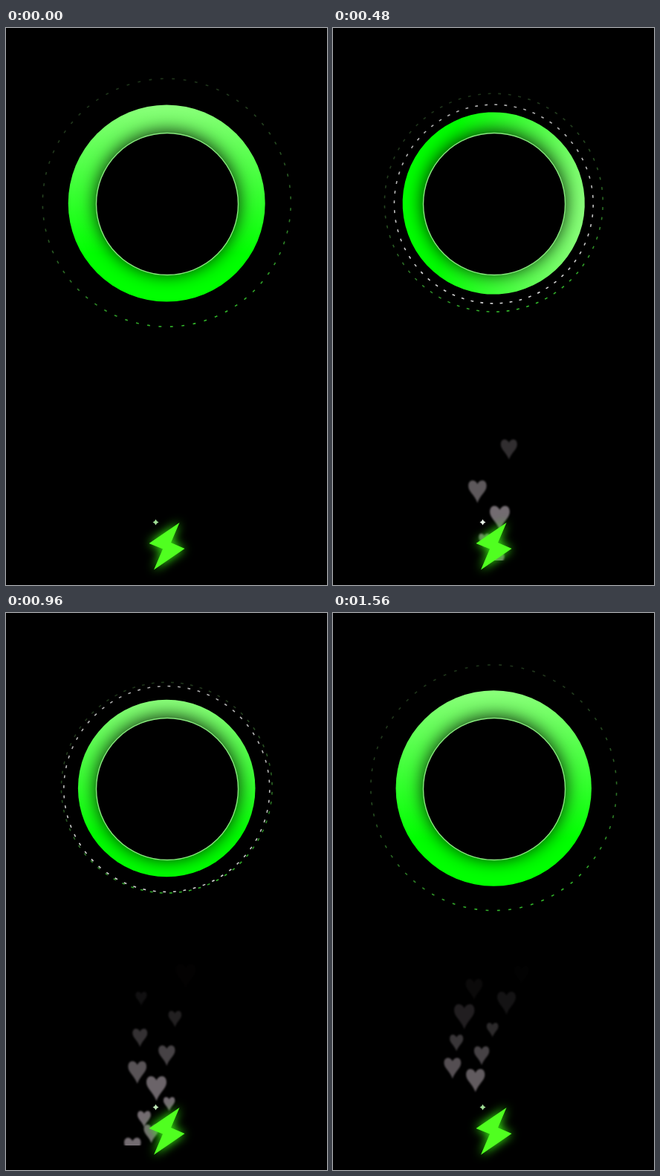
Animation of 432x750 px, one loop 1600 ms. Source, as an HTML page with a canvas:

```html
<!DOCTYPE html>
<html lang="en">
<head>
<meta charset="utf-8">
<title>Charging ring</title>
<style>
  html, body { margin: 0; width: 100%; height: 100%; overflow: hidden; background: #000; }
  canvas { display: block; }
</style>
</head>
<body>
<canvas id="stage" width="432" height="750"></canvas>
<script>
const ctx = document.getElementById('stage').getContext('2d');
const LOOP = 1600, STEP = 40, TURN = Math.PI * 2;
const HEARTS = 20, FLOOR = 717, CEILING = 480, RISE = .356;

const mix = (a, b, k) => a + (b - a) * k;
const clamp = v => Math.min(1, Math.max(0, v));
const fract = v => v % 1;
const easeInOut = k => k < .5 ? 4 * k ** 3 : 1 - 4 * (1 - k) ** 3;

// Goes from a to b until the peak, then to c at the end of the loop
const swing = (t, peak, a, b, c = a) =>
  t < peak ? mix(a, b, t / peak) : mix(b, c, (t - peak) / (LOOP - peak));

function circle(x, y, r) {
  ctx.beginPath();
  ctx.arc(x, y, r, 0, TURN);
}

function dots(cx, cy, r, count, phase, color) {
  ctx.lineWidth = 1.6;
  const half = 1.9 / r;
  for (let i = 0; i < count; i++) {
    const a = Math.PI / 2 + phase + i * TURN / count;
    ctx.strokeStyle = color(a);
    ctx.beginPath();
    ctx.arc(cx, cy, r, a - half, a + half);
    ctx.stroke();
  }
}

function greenDot(a) {
  const k = (1 + Math.sin(a + .3)) / 2;
  return `rgb(${mix(30, 50, k)},${mix(52, 185, k * k)},${mix(26, 42, k)})`;
}

function whiteDot(a) {
  const v = mix(170, 212, (1 + Math.sin(a)) / 2);
  return `rgb(${v},${v},${v})`;
}

function ring(t) {
  const r = swing(t, 800, 132.5, 116);
  ctx.save();
  ctx.translate(216.2, 236);
  ctx.rotate(-TURN * easeInOut(clamp((t - 16) / 784)));
  const shade = ctx.createLinearGradient(0, -r, 0, r);
  shade.addColorStop(0, '#8aff7a');
  shade.addColorStop(.76, '#00ff00');
  ctx.fillStyle = shade;
  circle(0, 0, r);
  ctx.fill();
  ctx.restore();

  ctx.save();
  ctx.shadowColor = 'rgba(0,0,0,.9)';
  ctx.shadowBlur = 24;
  ctx.shadowOffsetY = -2;
  ctx.fillStyle = '#000';
  circle(217, 237, 95.5);
  ctx.fill();
  ctx.restore();
  ctx.strokeStyle = '#86e87c';
  ctx.lineWidth = 1.4;
  circle(217, 237, 95.5);
  ctx.stroke();
}

function heartShape(x, y, w) {
  ctx.save();
  ctx.translate(x, y);
  ctx.scale(w / 2, w * .62);
  ctx.beginPath();
  ctx.moveTo(0, -.66);
  ctx.bezierCurveTo(.2, -1.1, 1, -1.15, 1, -.5);
  ctx.bezierCurveTo(1, 0, .3, .3, 0, 1);
  ctx.bezierCurveTo(-.3, .3, -1, 0, -1, -.5);
  ctx.bezierCurveTo(-1, -1.15, -.2, -1.1, 0, -.66);
  ctx.fill();
  ctx.restore();
}

// Hearts leave the bolt ever faster, drift back towards its axis and fade as they rise
function hearts(t) {
  ctx.save();
  ctx.beginPath();
  ctx.rect(0, 0, 432, FLOOR);
  ctx.clip();
  ctx.filter = 'blur(.8px)';
  ctx.fillStyle = '#c0b4bc';
  for (let i = 0; i < HEARTS; i++) {
    const born = 60 + 1300 * (i / HEARTS) ** .7;
    const age = t - born;
    const y = FLOOR - RISE * age;
    if (y < CEILING || y > FLOOR + 20) continue;
    const spread = fract(.9 + .45 * i) - .5;
    const offset = -14 + 22 * Math.cos((born - 475) / 1250 * TURN) + 30 * spread;
    const drift = (30 * spread - .3 * offset) / 160;
    const width = 15 + 14 * fract(.5 + .17 * i);
    ctx.globalAlpha = .6 * clamp((y - CEILING) / 170) ** 1.3;
    heartShape(208 + offset + drift * age, y, width);
  }
  ctx.restore();
}

function bolt() {
  ctx.save();
  ctx.shadowColor = '#3cff14';
  ctx.shadowBlur = 14;
  ctx.fillStyle = '#50ff20';
  ctx.fill(new Path2D('M233.5 666 192.5 694 211 701.5 199 729.5 240.5 701 222 693Z'));
  ctx.restore();
}

function sparkle(t) {
  const white = clamp(1.6 - Math.abs(t - 660) / 240);
  ctx.fillStyle = `rgb(${mix(160, 245, white)},${mix(222, 245, white)},${mix(150, 245, white)})`;
  ctx.fill(new Path2D('M201.5 661.5 203 664 205.5 665.5 203 667 201.5 669.5 200 667 197.5 665.5 200 664Z'));
}

function draw() {
  const t = Math.floor(performance.now() % LOOP / STEP) * STEP;
  ctx.fillStyle = '#000';
  ctx.fillRect(0, 0, 432, 750);
  dots(216.3, 235.2, swing(t, 775, 167, 134.6), 68, -.039, greenDot);
  dots(216.3, 237, swing(t, 775, 112, 147.3, 108), 64, .022, whiteDot);
  ring(t);
  hearts(t);
  bolt();
  sparkle(t);
  requestAnimationFrame(draw);
}
draw();
</script>
</body>
</html>
```
